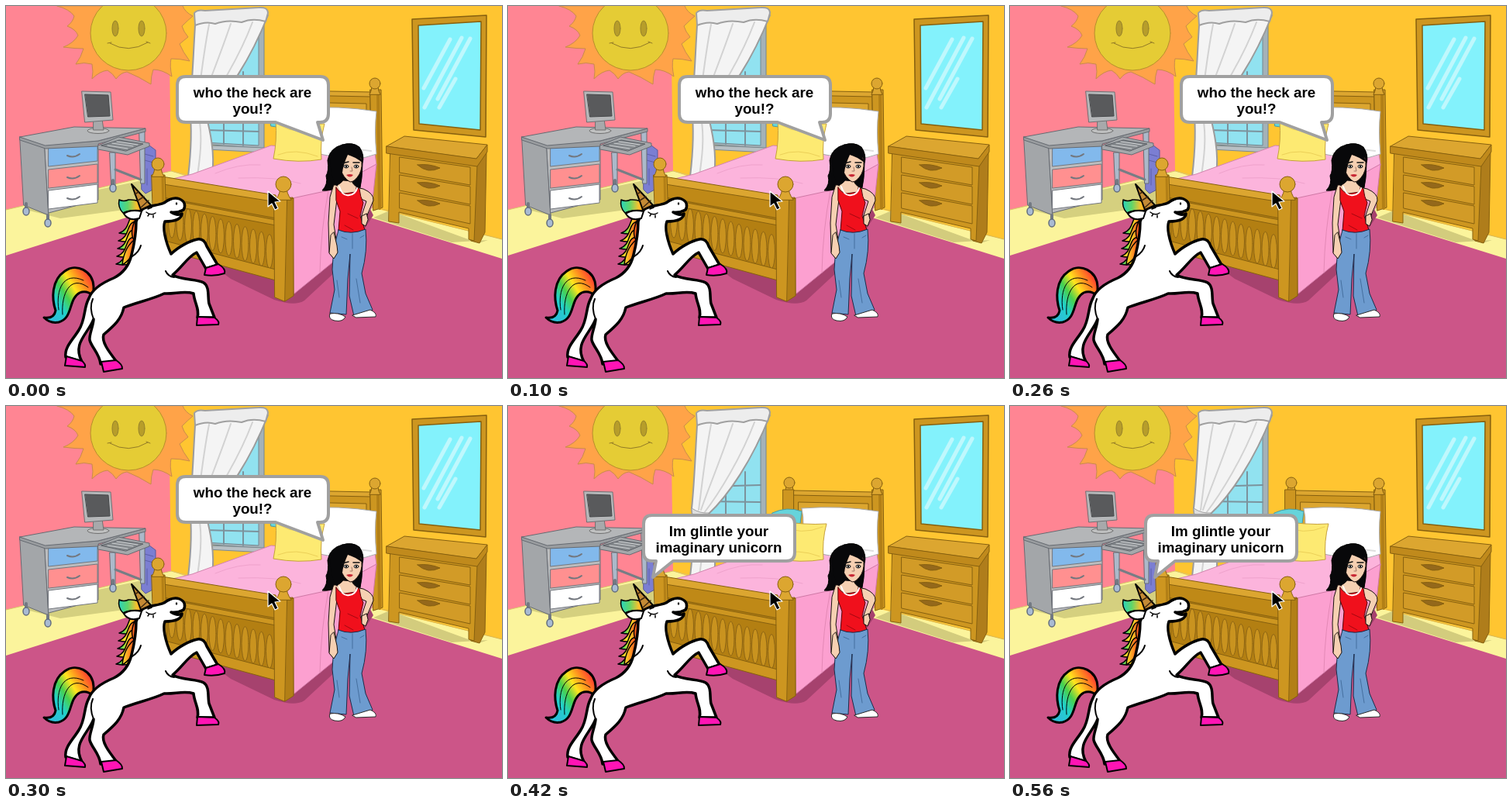
An HTML page with a canvas that plays this animation: 640 by 480 pixels, repeating every 0.58 s.

```html
<!DOCTYPE html>
<html lang="en">
<head>
<meta charset="utf-8">
<title>Bedroom chat</title>
<style>
html, body { margin: 0; width: 100%; height: 100%; overflow: hidden; background: #cc5588; }
canvas { display: block; width: 640px; height: 480px; }
</style>
</head>
<body>
<canvas id="stage" width="640" height="480"></canvas>
<script>
const LOOP = 580, SWITCH = 340;
const ctx = document.getElementById('stage').getContext('2d');
const room = document.createElement('canvas');
room.width = 640;
room.height = 480;
let g = room.getContext('2d');

const WOOD = '#cd9620', LIGHT = '#dca630', DARK = '#b27f16', EDGE = '#86600f';
const SKIN = '#f6d0b2', PINK = '#ff14b4';

function shape(d, fill, stroke, width = 1) {
  const p = new Path2D(d);
  if (fill) { g.fillStyle = fill; g.fill(p); }
  if (stroke) {
    g.strokeStyle = stroke;
    g.lineWidth = width;
    g.lineJoin = g.lineCap = 'round';
    g.stroke(p);
  }
}

function oval(x, y, rx, ry, fill, stroke, width = 1) {
  g.beginPath();
  g.ellipse(x, y, rx, ry, 0, 0, Math.PI * 2);
  if (fill) { g.fillStyle = fill; g.fill(); }
  if (stroke) { g.strokeStyle = stroke; g.lineWidth = width; g.stroke(); }
}

function blend(x0, y0, x1, y1, ...colors) {
  const grad = g.createLinearGradient(x0, y0, x1, y1);
  colors.forEach((c, i) => grad.addColorStop(i / (colors.length - 1), c));
  return grad;
}

function walls() {
  g.fillStyle = '#ffc531';
  g.fillRect(0, 0, 640, 480);
  shape('M0,0H210L213,213L0,263Z', '#ff8593');
  shape('M0,263L213,213L240,222L480,262L640,301V480H0Z', '#fbf49c');
  shape('M0,263L213,213L240,220', null, '#d9c46c');
  shape('M485,262L640,301', null, '#d9b651');
  shape('M0,322L190,262L470,273L640,326V480H0Z', '#cc5588');
  shape('M22,262L119,237L190,222V258L70,274Z', '#d5d07f');
  shape('M474,273L495,264L610,306L622,302L575,305Z', '#d3cc7d');
}

function sun() {
  shape('M66,0Q82,4 88,13Q86,21 79,26Q90,30 93,38Q87,48 74,53Q89,55 100,55Q97,66 90,75' +
    'Q101,72 111,75Q113,85 111,94Q121,84 131,83Q138,87 142,94Q148,86 156,85' +
    'Q171,91 187,101Q187,90 190,82Q202,82 214,91Q211,77 213,68Q225,68 237,71' +
    'Q228,59 224,49Q230,44 235,40Q229,33 227,26Q235,18 241,13Q231,8 228,0Z',
    '#ffa348', '#c98b4b');
  oval(158, 35, 49, 48, '#e5cc35', '#b78d2d');
  for (const x of [141, 175]) oval(x, 29, 4, 10, '#b79d2a', '#94802a');
  shape('M134,48Q158,62 183,47M131,48L136,47M181,46L186,48', null, '#927a26');
}

function windowAndCurtain() {
  shape('M252,18L333,18V184L252,178Z', '#a4b2b8', '#73868f');
  shape('M256,20L326,20V180L256,176Z', '#91e2f0', '#73868f');
  shape('M281,98V178M306,85V180M256,123L326,124M256,160L326,162M256,104L326,102', null, '#7c929c', 2);
  shape('M240,179L334,183V189L240,184Z', '#b8c0c4', '#7c8990');
  shape('M245,10C242,50 241,95 237,132C241,165 238,195 235,220Q250,225 266,218' +
    'C270,190 263,160 258,140C285,115 315,70 338,12Z', '#f4f4f4', '#9b9b9b', 2);
  shape('M262,24C254,65 250,105 246,134M290,23C274,70 258,108 249,134' +
    'M318,21C301,66 273,112 253,138M249,144C254,170 250,198 247,219', null, '#d2d2d2', 2);
  shape('M243,9Q247,4 257,6L326,2Q338,1 338,9L335,20Q318,15 304,21Q285,17 270,23Q258,19 244,25Z',
    '#ededed', '#a0a0a0', 2);
  shape('M237,132Q248,139 259,138L258,145Q247,146 238,139Z', '#dedede', '#a0a0a0');
}

function desk() {
  shape('M175,180L181,177L193,186V235L180,242L175,237Z', '#7b7ed2', '#55589d');
  shape('M179,191L190,194M179,199L190,202M182,210V231', null, '#5b5ea9');
  shape('M172,160H179V229H174ZM134,189H141V232H136Z', '#abb9ca', '#676c73');
  shape('M141,211L174,224', null, '#777d85', 3);
  shape('M18,169L50,181L55,270L23,257Z', '#a3a6a9', '#666b72');
  shape('M50,181L119,177V250L55,267Z', '#bbbdbf', '#666b72');
  [['183', '176', '#82b9ec'], ['211', '204', '#ff9090'], ['238', '230', '#ffffff']].forEach(([a, b, c]) => {
    shape(`M55,${a}L118,${b}v24L55,${+a + 24}Z`, c, '#73777e');
    shape(`M79,${+a + 10}q8,4 16,-2`, null, '#73777e', 2);
  });
  shape('M18,169L51,179L119,174L180,158V162L119,178V181L51,184L18,173Z', '#999c9f', '#666b72');
  shape('M18,169L88,156L180,158L119,174L51,180Z', '#b4b6b8', '#666b72');
  shape('M119,180L145,169L185,177V181L157,192L119,185Z', '#a5a8ab', '#666b72');
  shape('M123,180L146,173L177,178L155,187Z', '#85898d', '#5a5f65');
  shape('M131,180L157,184M137,177L164,181M143,175L170,179', null, '#d0d3d5');
  for (const [x, y] of [[26, 265], [54, 280], [138, 235]]) {
    shape(`M${x},${y - 10}v8`, null, '#737982', 4);
    oval(x, y, 4, 5, '#a9bbd3', '#626d7e', 1.5);
  }
  oval(119, 161, 14, 3.5, '#bfc0c0', '#707070');
  shape('M113,146H124L126,160H113Z', '#a7a9ab', '#707070');
  shape('M98,110L135,111L138,147L102,150Z', '#b5b7b9', '#6e7073');
  shape('M102,114L132,115L134,142L106,143Z', '#595a5c', '#46484a');
}

function knob(x, y, r) {
  shape(`M${x - r},${y + r * 2}Q${x - 3},${y + r} ${x - 5},${y + r / 2}H${x + 5}Q${x + 3},${y + r} ${x + r},${y + r * 2}Z`, LIGHT, EDGE);
  oval(x, y, r, r, LIGHT, EDGE);
}

function bed() {
  shape('M255,326L348,349L371,372L420,332L470,262L474,270L428,340L385,380Q373,388 346,379L290,352Z', '#a6426e');
  knob(363, 99, 7);
  shape('M355,108H369V190H355Z', WOOD, EDGE);
  shape('M369,111L470,113V200H369Z', WOOD, EDGE);
  shape('M369,109L470,111V117L369,115ZM375,124L465,126V185H375Z', LIGHT, EDGE);
  shape('M470,108H484L486,260L474,264Z', WOOD, EDGE);
  shape('M480,109L482,261', null, DARK, 4);
  knob(476, 100, 7);
  shape('M207,225L240,217L342,180L476,190L478,205L416,239L365,250Z', '#fcb4dc', '#d284ad');
  shape('M365,249L416,238L478,204L472,260L420,332L371,372Z', '#fca0d0', '#cf78a6');
  shape('M416,238Q406,290 405,344', null, '#e489b6');
  shape('M270,216Q300,203 328,205M300,222Q350,220 380,229', null, '#efa2cc');
  shape('M341,138Q360,129 379,136L376,160L342,155Z', '#66d4db', '#499ba3');
  shape('M379,132Q430,128 478,136Q475,160 478,191Q452,202 410,192Q383,187 377,180Q384,154 379,132Z', '#fff', '#a9a9a9');
  shape('M417,190Q442,183 471,187', null, '#dedede', 2);
  shape('M348,148Q382,154 411,152Q405,174 407,198Q378,203 345,197Q350,174 348,148Z', '#fdea72', '#c6a13c');
  shape('M353,154Q377,168 406,156M351,192Q373,183 402,194', null, '#ecd058');

  shape('M205,238L348,270V351L205,310Z', '#b37f12', EDGE);
  for (let i = 0; i < 13; i++) {
    oval(214 + i * 10.5, 277 + i * 3.3, 4.5, 22, '#c9931f', '#8c6414');
  }
  shape('M205,303L348,340V354L205,315Z', WOOD, EDGE);
  shape('M203,227L349,252V274L203,247Z', '#bf8917', EDGE);
  shape('M201,220L348,244L350,253L203,230Z', LIGHT, EDGE);
  shape('M205,249L348,276V283L205,256Z', WOOD, EDGE);
  shape('M188,218H205L208,309L191,304Z', WOOD, EDGE);
  shape('M202,219L204,307', null, DARK, 3);
  knob(196, 204, 8);
  shape('M346,249L370,247L371,373L359,381L347,376Z', WOOD, EDGE);
  shape('M363,250L371,248V374L360,381Z', DARK, EDGE);
  knob(358, 230, 10);
}

function mirrorAndDresser() {
  shape('M524,17L620,12L619,169L526,160Z', WOOD, EDGE, 1.5);
  shape('M532,25L613,20L612,160L533,152Z', '#83f2fc', EDGE, 1.5);
  shape('M573,43L539,106M588,41L540,131M599,42L557,120M580,94L559,131', null, '#bff8fd', 5);

  shape('M606,205L620,187L618,292L611,306L600,303Z', '#af7d1b', EDGE);
  shape('M496,188L608,205L604,303L597,301V287L507,266V280L494,278Z', WOOD, EDGE);
  shape('M491,181L514,168L621,179L607,197Z', LIGHT, EDGE);
  shape('M491,181L607,197L621,179V188L608,207L491,190Z', '#c08a1c', EDGE);
  for (let i = 0; i < 3; i++) {
    const y = 195 + i * 23;
    shape(`M508,${y}L599,${y + 13 + i * 2}v23L508,${y + 20}Z`, '#d29b27', EDGE);
    shape(`M531,${y + 10}Q546,${y + 8} 560,${y + 14}Q544,${y + 22} 531,${y + 10}Z`, '#94681b', EDGE);
  }
}

// One swept-back strand: root on the neck, tip curling out to the left.
function lock(x, y, len, drop, colors) {
  const tipX = x - len, tipY = y + drop;
  shape(`M${x},${y}C${x - len * 0.7},${y} ${x - len * 0.3},${tipY - 6} ${tipX},${tipY}` +
    `Q${x - len * 0.2},${tipY + 4} ${x + 2},${y + drop * 0.7}Z`,
    blend(tipX, y, x, y, ...colors), '#000', 1.5);
}

function unicorn() {
  const tail = blend(112, 352, 55, 388, '#f33', '#ff8a1f', '#ffe51e', '#48d04d', '#21d0ca', '#2cc0d8');
  shape('M113,374Q104,366 95,370C80,378 87,403 68,408Q57,410 49,402Q62,404 64,393' +
    'C59,378 58,354 76,342C91,331 112,342 113,362Z', tail, '#000', 3);
  shape('M106,363C83,346 71,371 73,398M100,354C74,342 64,366 68,392', null, '#000', 1);

  const rainbow = ['#27d2d2', '#6ad74a', '#ffe52c', '#ff8a20', '#f03a22'];
  const warm = ['#ff8a20', '#ffe52c', '#ff7a20', '#e92f22'];
  for (let i = 0; i < 5; i++) {
    lock(171 - i, 268 + i * 10, 25, 25, i % 2 ? warm : rainbow);
  }
  shape('M171,268Q158,290 165,302Q152,313 150,334Q164,326 168,306L175,272Z',
    blend(150, 300, 172, 300, '#ffe52c', '#ff7a20', '#e92f22'), '#000', 1.5);

  const body = 'M174,263C184,257 195,258 204,254C212,248 219,247 224,249C231,252 232,258 229,263' +
    'Q222,267 213,266Q221,271 227,268C226,277 213,278 205,278C202,286 205,302 213,320' +
    'C222,311 237,303 247,301C253,300 257,304 259,310L273,334L258,339L246,318' +
    'C235,323 228,336 215,347C226,354 246,352 255,357C263,362 260,376 262,384L269,402H247' +
    'C250,391 243,383 242,371C230,367 217,372 204,371C190,378 167,383 152,389' +
    'C149,404 140,412 126,424C123,433 132,445 142,458L122,462C121,449 110,440 108,431' +
    'C107,424 113,412 113,404C106,423 85,435 98,459L77,453C75,440 87,430 94,418' +
    'C103,404 100,389 107,377C111,366 122,358 139,351C151,345 159,334 162,321' +
    'C166,305 168,289 168,278Z';
  shape(body, '#fff', '#000', 3.5);
  shape('M113,404Q107,389 112,378M206,342Q209,349 217,350M163,323Q172,317 174,309', null, '#000', 2);
  shape('M258,338L274,333Q284,339 282,345Q270,349 256,347ZM247,401L269,402Q276,407 274,411L246,412Z' +
    'M78,452L98,458Q103,462 102,466L76,464ZM123,459L142,457Q151,463 150,468L126,472Z', PINK, '#000', 2);

  shape('M176,264Q160,262 151,267Q144,260 146,250Q152,253 158,250Q171,249 180,258Z',
    blend(145, 258, 181, 258, '#27d2c0', '#5fd66a', '#ffc02c', '#ff8a20'), '#000', 1.5);
  shape('M172,274Q158,278 152,268Q160,262 175,265Z', '#fff', '#000', 2);
  shape('M162,230L174,263L187,257Z', '#c48a35', '#000', 2);
  shape('M166,243L171,240M170,251L178,246M174,260L184,251', null, '#402a11', 1.5);
  shape('M181,266Q187,271 193,267M183,262L188,260M185,268L183,271M190,270V273', null, '#000', 1.5);
  oval(220, 255, 1.2, 1.8, '#000');
}

function girl() {
  shape('M434,179Q447,175 456,182Q463,192 460,203Q460,222 456,240L430,234Q417,239 408,238' +
    'Q416,230 413,219Q417,213 415,199Q418,183 434,179Z', '#08080a', '#000');
  shape('M423,231Q430,232 435,225L446,226Q450,235 461,236Q475,242 474,251L463,277L458,273L465,252' +
    'L456,248L435,249L427,249L423,282L427,307L428,319L423,326L417,318L416,280L418,247Z', SKIN, '#17100e');
  shape('M436,190Q448,190 458,196Q461,207 456,217Q450,227 444,227Q435,222 431,209Z', SKIN, '#22130f');
  shape('M428,182Q452,179 460,202Q449,194 441,192Q435,205 434,215Q431,228 427,233Q417,218 419,196Z', '#08080a');
  shape('M434,203L442,201M448,202L456,202', null, '#111', 1.5);
  for (const x of [439, 452]) {
    oval(x, 207, 3, 2, '#fff', '#111');
    oval(x, 207, 1.3, 1.5, '#111');
  }
  shape('M446,208L447,213L444,213', null, '#a17866');
  shape('M439,218Q444,216 448,218Q444,223 439,218Z', '#c82835');
  shape('M426,234Q430,241 437,242L451,240L452,234L456,236Q457,246 461,254L457,271L463,289' +
    'Q445,297 429,290L431,265L426,251Z', '#f0101c', '#510409');
  shape('M430,233Q434,246 443,244Q451,243 453,235', null, '#fff', 2);
  shape('M441,268L454,274M437,283L448,289', null, '#a40710');
  shape('M429,289Q445,296 464,288Q467,316 459,345L464,371L473,392L449,400L443,374L444,320L441,352' +
    'L439,398L418,396L424,366L421,340Q422,313 429,289Z', '#6d9bcf', '#192c4b');
  shape('M447,294V313M433,298L440,301M457,299L462,296M427,354L430,376M452,352L457,383', null, '#456f9f');
  shape('M418,397Q429,395 438,401Q435,408 424,406Q415,404 418,397ZM447,399L470,392Q479,396 477,401L452,402Z',
    '#fff', '#29292a');
  shape('M423,292L427,309L428,318L423,326L417,319L419,296Z', SKIN, '#17100e');
  shape('M465,268L459,271L459,281L464,284L467,276Z', SKIN, '#17100e');
}

function cursor() {
  shape('M338,239V259L343,255L347,263L351,261L347,253L354,252Z', '#000', '#fff', 1.2);
}

function bubble(x, y, tail, lines) {
  const box = `M${x + 11},${y}h173q11,0 11,11v37q0,11 -11,11`;
  shape(box + tail + `H${x + 11}q-11,0 -11,-11v-37q0,-11 11,-11Z`, '#fff', '#a0a0a0', 4);
  g.fillStyle = '#000';
  g.font = 'bold 18.8px "Liberation Sans", Arial, sans-serif';
  g.textAlign = 'center';
  lines.forEach((s, i) => g.fillText(s, x + 97, y + 26.5 + i * 21));
}

[walls, sun, windowAndCurtain, desk, bed, mirrorAndDresser, unicorn, girl, cursor].forEach(draw => draw());
g = ctx;

function frame(time) {
  ctx.drawImage(room, 0, 0);
  if (time % LOOP < SWITCH) {
    bubble(221, 91, 'H402L409,173L348,150', ['who the heck are', 'you!?']);
  } else {
    bubble(175, 141, 'H213L187,221L191,200', ['Im glintle your', 'imaginary unicorn']);
  }
}

const start = performance.now();
function tick() {
  frame(performance.now() - start);
  requestAnimationFrame(tick);
}
tick();
</script>
</body>
</html>
```
